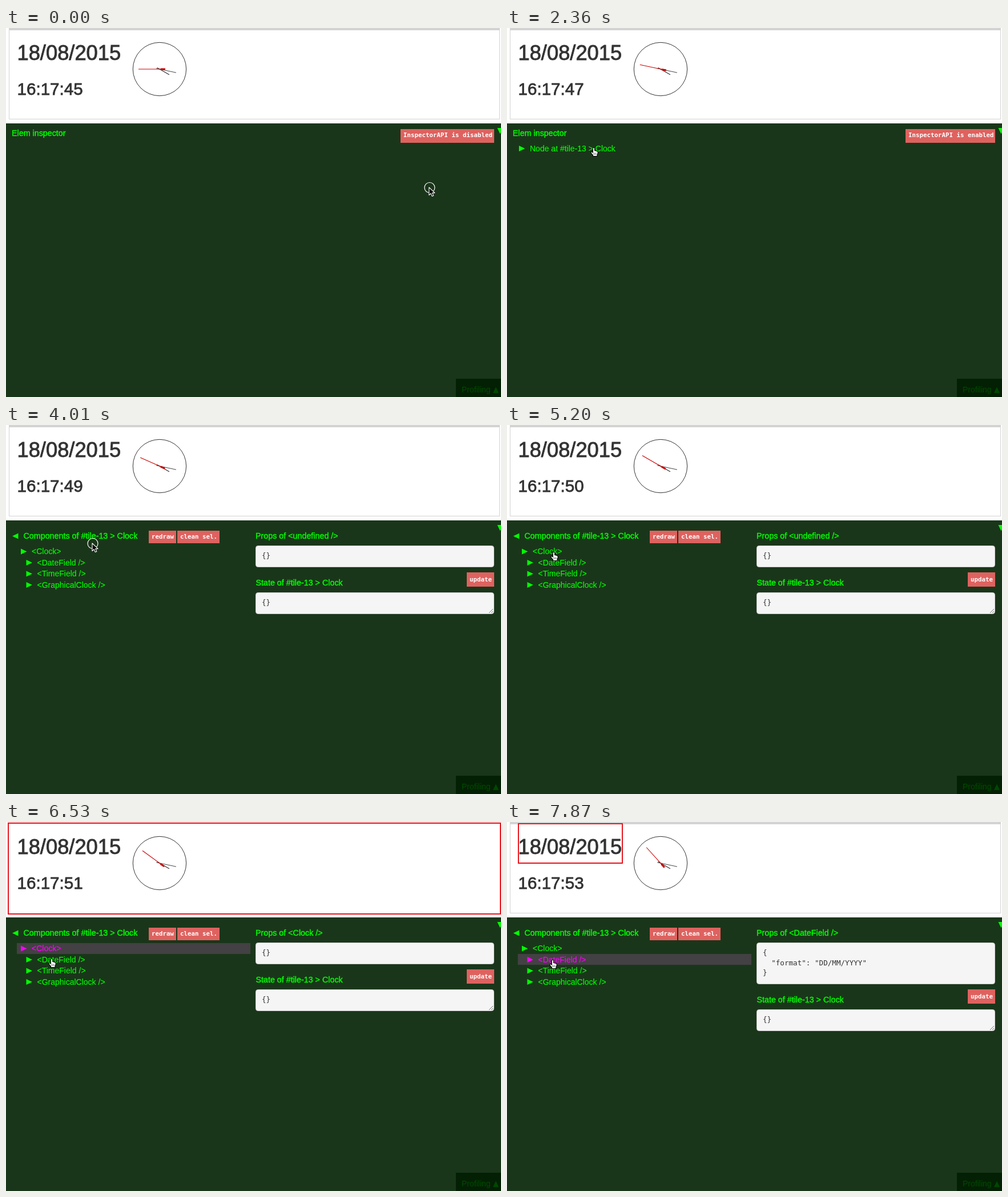
An HTML page with a canvas for the animation above (8 s loop, 867x646 px).

```html
<!DOCTYPE html>
<html lang="en">
<head>
<meta charset="utf-8">
<title>Clock inspector</title>
<style>
  html, body { margin: 0; width: 867px; height: 646px; overflow: hidden; background: #fff; }
  canvas { display: block; }
</style>
</head>
<body>
<canvas id="stage" width="867" height="646"></canvas>
<script>
const ctx = document.getElementById('stage').getContext('2d');
const LOOP = 8000, STEP = 148.5;
const SANS = '"Liberation Sans", Arial, sans-serif';
const MONO = '"DejaVu Sans Mono", monospace';
const GREEN = '#0f0', PINK = '#f0f', RED = '#de625f', INK = '#333';

const TICKS = [7, 13, 20, 27, 33, 40, 47, 53];
// Pointer moves: first step, last step, x, y
const MOVES = [
  [0, 4, 771, 188], [7, 10, 190, 205], [11, 13, 160, 221], [13, 16, 152, 209],
  [18, 19, 151, 207], [27, 31, 84, 234], [32, 35, 82, 222], [41, 44, 80, 239], [52, 53, 80, 241]
];
const HAND_TIMES = [[4, 7], [15, 18], [30, 99]];
const CLICK_TIMES = [[0, 0], [7, 7], [19, 27], [37, 37], [47, 47]];

const ARROW = new Path2D('M0 0V13.5L3.2 10.6 5.3 15.5 7.8 14.5 5.7 9.6H10Z');
const HAND = new Path2D('M-1.6 1.5Q0-1 1.6 1.5V5.5L5.5 6.5Q7.5 7 7.3 9.5L6 13V15.5H-1.5V13.5L-5 9.5Q-5 7-2.8 8L-1.6 9.2Z');

const within = (ranges, step) => ranges.some(([a, b]) => step >= a && step <= b);

function box(x, y, w, h, color) {
  ctx.fillStyle = color;
  ctx.fillRect(x, y, w, h);
}

function text(str, x, y, font, color, weight = 0) {
  ctx.font = font;
  ctx.fillStyle = ctx.strokeStyle = color;
  ctx.fillText(str, x, y);
  if (weight) {
    ctx.lineWidth = weight;
    ctx.strokeText(str, x, y);
  }
}

const label = (str, x, y, color = GREEN) => text(str, x, y, `14px ${SANS}`, color, .15);
const heading = (str, x, y) => text(str, x, y, `14.3px ${SANS}`, GREEN, .45);

function triangle(x, y, angle, color = GREEN) {
  ctx.save();
  ctx.translate(x, y);
  ctx.rotate(angle);
  ctx.fillStyle = color;
  ctx.fill(new Path2D('M-5-5L5.5 0-5 5Z'));
  ctx.restore();
}

function button(str, x, y, w, h, baseline) {
  box(x, y, w, h, RED);
  text(str, x + 5, baseline, `bold 10.8px ${MONO}`, '#fff');
}

function codeBox(y, h, lines) {
  ctx.beginPath();
  ctx.roundRect(437.5, y + .5, 417, h - 1, 4);
  ctx.fillStyle = '#f5f5f5';
  ctx.fill();
  ctx.strokeStyle = '#ccc';
  ctx.lineWidth = 1;
  ctx.stroke();
  lines.forEach((line, i) => text(line, 448, y + 22 + i * 17.6, `12.6px ${MONO}`, INK));
}

function line(x1, y1, x2, y2, color, width = 1) {
  ctx.beginPath();
  ctx.moveTo(x1, y1);
  ctx.lineTo(x2, y2);
  ctx.strokeStyle = color;
  ctx.lineWidth = width;
  ctx.stroke();
}

function hand(degrees, from, to, color, width) {
  const a = degrees * Math.PI / 180, dx = Math.sin(a), dy = -Math.cos(a);
  line(269 + dx * from, 72 + dy * from, 269 + dx * to, 72 + dy * to, color, width);
}

function outline(x, y, w, h) {
  ctx.strokeStyle = '#e8141c';
  ctx.lineWidth = 2;
  ctx.strokeRect(x, y, w, h);
}

function drawTile(step) {
  const seconds = 45 + TICKS.filter(s => s <= step).length;
  const tileSelected = step >= 37 && step < 47;
  box(0, 0, 867, 167, '#fff');
  if (tileSelected) {
    outline(4, 2, 862, 159);
  } else {
    box(5, 0, 860, 160, '#d3d3d3');
    box(6, 4, 858, 155, '#fff');
  }
  text('18/08/2015', 19.5, 56, `36.3px ${SANS}`, INK, .9);
  text('16:17:' + seconds, 19.5, 117, `29.6px ${SANS}`, INK, .8);

  ctx.beginPath();
  ctx.arc(269, 72, 46.7, 0, 7);
  ctx.strokeStyle = INK;
  ctx.lineWidth = 1;
  ctx.stroke();
  hand(120, -5, 19.6, INK, 1.2);
  hand(102, -6, 29.6, '#444', 1);
  hand(seconds * 6, -10, 37, '#c00', 1.1);
  hand(seconds * 6, -10, -2, '#c00', 3);
  if (step >= 47) outline(20, 3, 182, 69);
}

function drawNodeList(step) {
  heading('Elem inspector', 10, 189);
  if (step < 7) button('InspectorAPI is disabled', 691, 177, 164, 24, 190.5);
  else button('InspectorAPI is enabled', 698, 177, 157, 24, 190.5);
  if (step >= 12) {
    triangle(26, 211, 0);
    label('Node at #tile-13 > Clock', 40, 215.5);
  }
}

function drawComponents(step) {
  const selected = step < 37 ? -1 : step < 47 ? 0 : 1;
  const rows = ['<Clock>', '<DateField />', '<TimeField />', '<GraphicalClock />'];
  triangle(16.5, 194.5, Math.PI);
  heading('Components of #tile-13 > Clock', 30.5, 199);
  button('redraw', 250, 185, 48, 22, 199);
  button('clean sel.', 300, 185, 74, 22, 199);
  rows.forEach((row, i) => {
    const y = 221.5 + i * 19.5, x = i ? 40.5 : 31, color = i === selected ? PINK : GREEN;
    if (i === selected) box(19, Math.round(y - 9.6), 409, 19, '#434143');
    triangle(x, y, 0, color);
    label(row, x + 14, y + 4.8, color);
  });

  const shift = selected === 1 ? 35 : 0;
  const props = shift ? ['{', '  "format": "DD/MM/YYYY"', '}'] : ['{}'];
  heading(`Props of <${['undefined', 'Clock', 'DateField'][selected + 1]} />`, 437, 199);
  codeBox(211, shift ? 73 : 38, props);
  heading('State of #tile-13 > Clock', 437.5, 281 + shift);
  button('update', 807, 258 + shift, 48, 25, 274 + shift);
  codeBox(293 + shift, 38, ['{}']);
  for (const d of [3, 7]) line(853 - d, 329 + shift, 853, 329 + shift - d, '#777');
}

function drawPointer(step) {
  let x = 741, y = 279;
  for (const [start, end, toX, toY] of MOVES) {
    const p = Math.min(1, Math.max(0, (step - start) / (end - start)));
    const eased = p * p * (3 - 2 * p);
    x += (toX - x) * eased;
    y += (toY - y) * eased;
  }
  const pointing = within(HAND_TIMES, step);
  ctx.save();
  ctx.translate(x, y);
  if (within(CLICK_TIMES, step)) {
    ctx.beginPath();
    ctx.arc(1, .5, 9, 0, 7);
    ctx.strokeStyle = '#fff';
    ctx.lineWidth = 1.2;
    ctx.stroke();
  }
  const shape = pointing ? HAND : ARROW;
  ctx.fillStyle = pointing ? '#fff' : '#000';
  ctx.strokeStyle = pointing ? '#000' : '#fff';
  ctx.lineWidth = 1.1;
  ctx.lineJoin = 'round';
  ctx.fill(shape);
  ctx.stroke(shape);
  if (pointing) for (const fx of [0, 2, 4]) line(fx, 9.5, fx, 13, '#555', .8);
  ctx.restore();
}

function draw(now) {
  const step = Math.floor((now % LOOP + 18) / STEP);
  drawTile(step);
  box(0, 167, 867, 479, '#1a361a');
  triangle(865.5, 180, Math.PI / 2);
  if (step < 19) drawNodeList(step);
  else drawComponents(step);
  box(788, 614, 79, 32, '#042004');
  label('Profiling', 798, 638, '#004800');
  triangle(858, 634, -Math.PI / 2, '#004800');
  drawPointer(step);
}

const began = performance.now();
function tick() {
  draw(performance.now() - began);
  requestAnimationFrame(tick);
}
tick();
</script>
</body>
</html>
```
